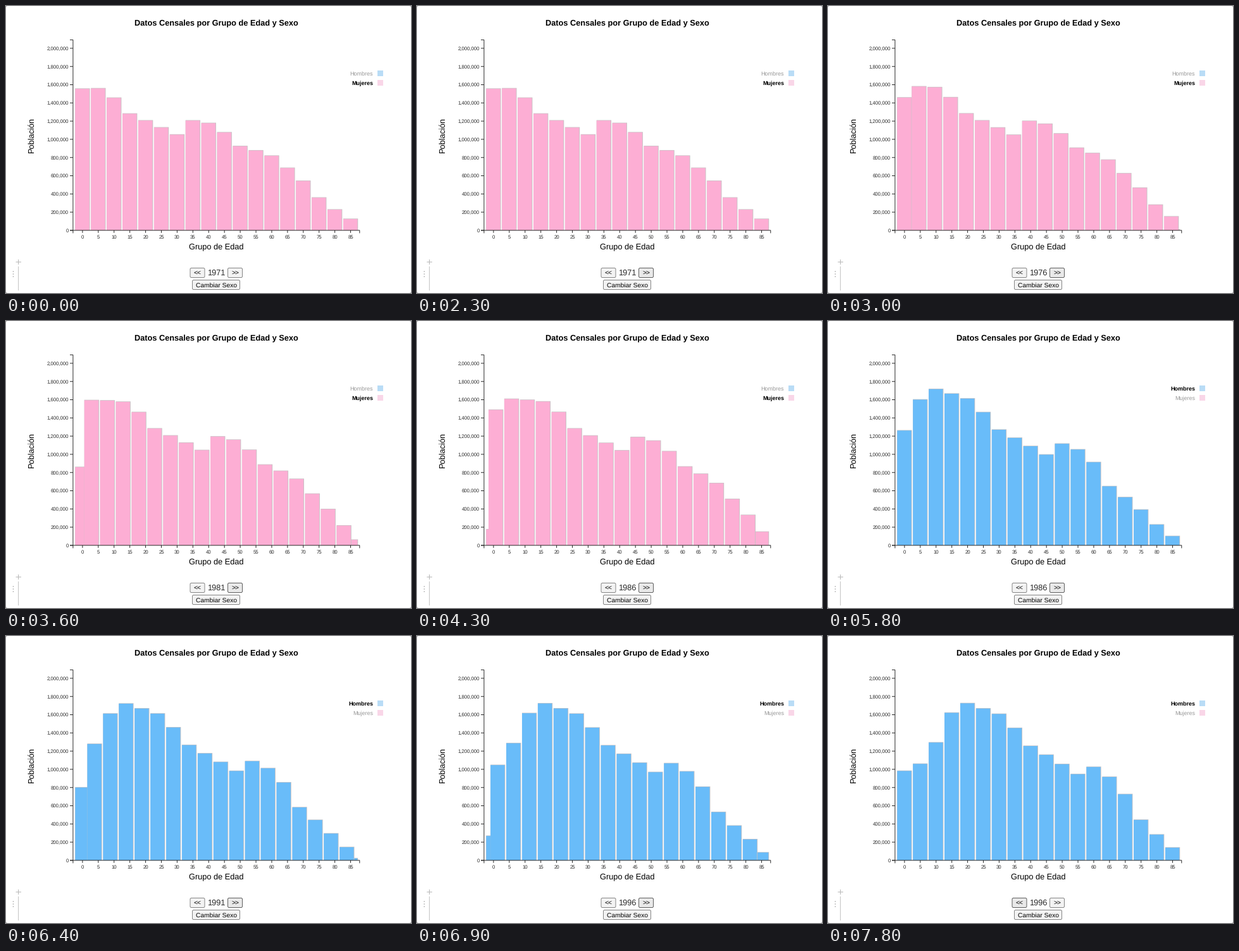
Write a matplotlib script that moves like this. It is 640x454 px and loops after 8 s.

```python
import matplotlib.pyplot as plt
import numpy as np
from matplotlib.animation import FuncAnimation
from matplotlib.colors import to_rgb
from matplotlib.patches import Circle, FancyBboxPatch, Polygon, Rectangle

plt.rcParams["text.hinting"] = "none"

W, H, DPI = 640, 454, 100
FRAMES, STEP_MS = 80, 100
PX = 72 / DPI

GROUPS = 18
X0, STEP, BAR_W = 109.3, 24.92, 22.4
Y0, PER_K = 354.9, 0.144            # baseline and pixels per thousand people
PINK, BLUE = "#fdaed4", "#69bcf9"
INK, GREY = "#2a2a2a", "#999999"

# Cohort sizes in thousands, keyed by five-year group in 1986
COHORTS = [(-2, 962), (-1, 1020), (0, 1235), (1, 1540), (2, 1637),
           (4.4, 1580), (6, 1290), (9, 1058), (10, 1217), (11.4, 1185),
           (13, 958), (15, 900), (17, 700), (18.3, 500), (20, 390)]
MEN_PER_WOMAN = [(2, 1.06), (5, 1), (12, 0.95), (13, 0.845), (17, 0.74)]

SHIFTS = [(2450, 1976), (3204, 1981), (4050, 1986), (5940, 1991), (6593, 1996)]
SHIFT_MS = 750
SWAP, SWAP_MS = 5060, 500
HOVERS = [(0, None), (2300, "next"), (4900, "swap"), (5800, "next"),
          (7500, None), (7800, "prev")]


def ease(t):
    t = min(max(t, 0), 1)
    return 4 * t ** 3 if t < 0.5 else 1 - 4 * (1 - t) ** 3


def mix(a, b, p):
    return np.asarray(a) * (1 - p) + np.asarray(b) * p


def population(year, men):
    """Cohort size, slight early growth, then Gompertz mortality."""
    age = np.arange(GROUPS)
    cohort = age + (1986 - year) / 5
    size = np.interp(cohort, *zip(*COHORTS))
    if men:
        size = size * np.interp(cohort, *zip(*MEN_PER_WOMAN))
    risk = 3.3e-4 if men else 2.3e-4
    growth = 1 - 0.035 * np.exp(-age / 1.5)
    return size * growth * np.exp(-risk * np.exp(age / 2))


fig = plt.figure(figsize=(W / DPI, H / DPI), dpi=DPI, facecolor="white")
ax = fig.add_axes([0, 0, 1, 1])
ax.set_xlim(0, W)
ax.set_ylim(H, 0)
ax.axis("off")


def text(x, y, s, size, color=INK, ha="center", **kw):
    return ax.text(x, y, s, fontsize=size * PX, color=color, ha=ha,
                   va="baseline", family="Liberation Sans", **kw)


def line(xs, ys, color=INK, width=1):
    ax.plot(xs, ys, color=color, lw=width * PX, zorder=5, snap=False,
            solid_capstyle="butt", solid_joinstyle="miter")


def button(x, y, w, h, label):
    box = FancyBboxPatch((x, y), w, h, lw=0.9 * PX,
                         boxstyle="round,pad=0,rounding_size=2")
    ax.add_patch(box)
    text(x + w / 2, y + h / 2 + 3.6, label, 10.2, "black")
    return box


class Bar:
    """A bar whose grey backing shows along its top and right edges."""

    def __init__(self, z):
        self.shade = Rectangle((0, 0), 0, 0, fc="#c6c2c4", lw=0, zorder=z)
        self.body = Rectangle((0, 0), 0, 0, lw=0, zorder=z + 0.01)
        for part in (self.shade, self.body):
            part.set_snap(False)
            ax.add_patch(part)

    def set(self, slot, value, color):
        x, h = X0 + STEP * slot, value * PER_K
        self.shade.set_bounds(x, Y0 - h - 0.5, BAR_W + 0.9, h + 0.5)
        self.body.set_bounds(x, Y0 - h + 0.2, BAR_W, h - 0.2)
        self.body.set_facecolor(color)
        for part in (self.shade, self.body):
            part.set_visible(h > 0.5)


# Axes
line([101, 105.9, 105.9, 101], [53.6, 53.6, Y0, Y0])
line([105.9, 105.9, 558.8, 558.8], [Y0 + 4.5, Y0, Y0, Y0 + 4.5])
for v in range(0, 2001, 200):
    y = Y0 - v * PER_K
    line([101, 106], [y, y])
    text(99, y + 2.8, f"{v * 1000:,}", 7.75, ha="right")
for i in range(GROUPS):
    x = X0 + STEP * i + BAR_W / 2 + 0.4
    line([x, x], [Y0, Y0 + 4])
    text(x, 367.7, str(5 * i), 7.75)

# Titles
text(332, 31.2, "Datos Censales por Grupo de Edad y Sexo", 12.8, "black",
     weight="bold")
text(332, 385.5, "Grupo de Edad", 12.8, "black")
text(43.4, 204, "Población", 12.8, "black", rotation=90,
     rotation_mode="anchor")

# Legend
men_label = text(580, 109.9, "Hombres", 9.05, ha="right")
women_label = text(580, 124.8, "Mujeres", 9.05, ha="right")
for y, color in ((102, "#b9dcf6"), (117, "#f9d6e8")):
    ax.add_patch(Rectangle((587, y), 9, 9, fc=color, lw=0))

# Controls
year_text = text(332, 426, "1971", 12.8)
buttons = {
    "prev": button(291, 414.5, 23, 15, "<<"),
    "next": button(350.5, 414.5, 23, 15, ">>"),
    "swap": button(294.5, 433.5, 75, 15, "Cambiar Sexo"),
}

# Page margin marks and rounded corners
line([15.5, 24], [405, 405], "#b5b5b5")
line([19.6, 19.6], [401, 409], "#b5b5b5")
line([19.6, 19.6], [412, 450], "#c4c4c4")
for y in (420, 424, 428):
    ax.add_patch(Circle((11.5, y), 0.9, fc="#b5b5b5", lw=0))
for cx, sx in ((0, 1), (W, -1)):
    for cy, sy in ((0, 1), (H, -1)):
        ax.add_patch(Polygon([(cx, cy), (cx + 2 * sx, cy), (cx, cy + 2 * sy)],
                             fc="#c8c8c8", lw=0))

leaving, entering = Bar(1), Bar(1.1)
cohort_bars = [Bar(2 + 0.02 * k) for k in range(GROUPS - 1)]


def draw(i):
    t = i * STEP_MS
    year, prev, p = 1971, 1971, 0
    for start, label in SHIFTS:
        if t >= start:
            year, prev = label, label - 5
            p = ease((t - start) / SHIFT_MS)
    if p == 1:
        prev, p = year, 0
    swap = ease((t - SWAP) / SWAP_MS)
    before, after = (mix(population(y, False), population(y, True), swap)
                     for y in (prev, year))
    color = mix(to_rgb(PINK), to_rgb(BLUE), swap)

    # Each cohort slides one group to the right as it ages
    leaving.set(GROUPS - 1, before[-1] * (1 - p), color)
    entering.set(0, after[0] * p, color)
    for k, bar in enumerate(cohort_bars):
        bar.set(k + p, mix(before[k], after[k + 1], p), color)
    year_text.set_text(str(year))

    men_on = t >= SWAP
    for label, on in ((men_label, men_on), (women_label, not men_on)):
        label.set_weight("bold" if on else "normal")
        label.set_color("black" if on else GREY)

    hover = [name for start, name in HOVERS if t >= start][-1]
    for name, box in buttons.items():
        box.set_facecolor("#e9e9e9" if name == hover else "#f3f3f3")
        box.set_edgecolor("#4f4f4f" if name == hover else "#7a7a7a")
    return []


anim = FuncAnimation(fig, draw, frames=FRAMES, interval=STEP_MS,
                     init_func=lambda: draw(0), repeat=True, repeat_delay=0)
plt.show()
```
